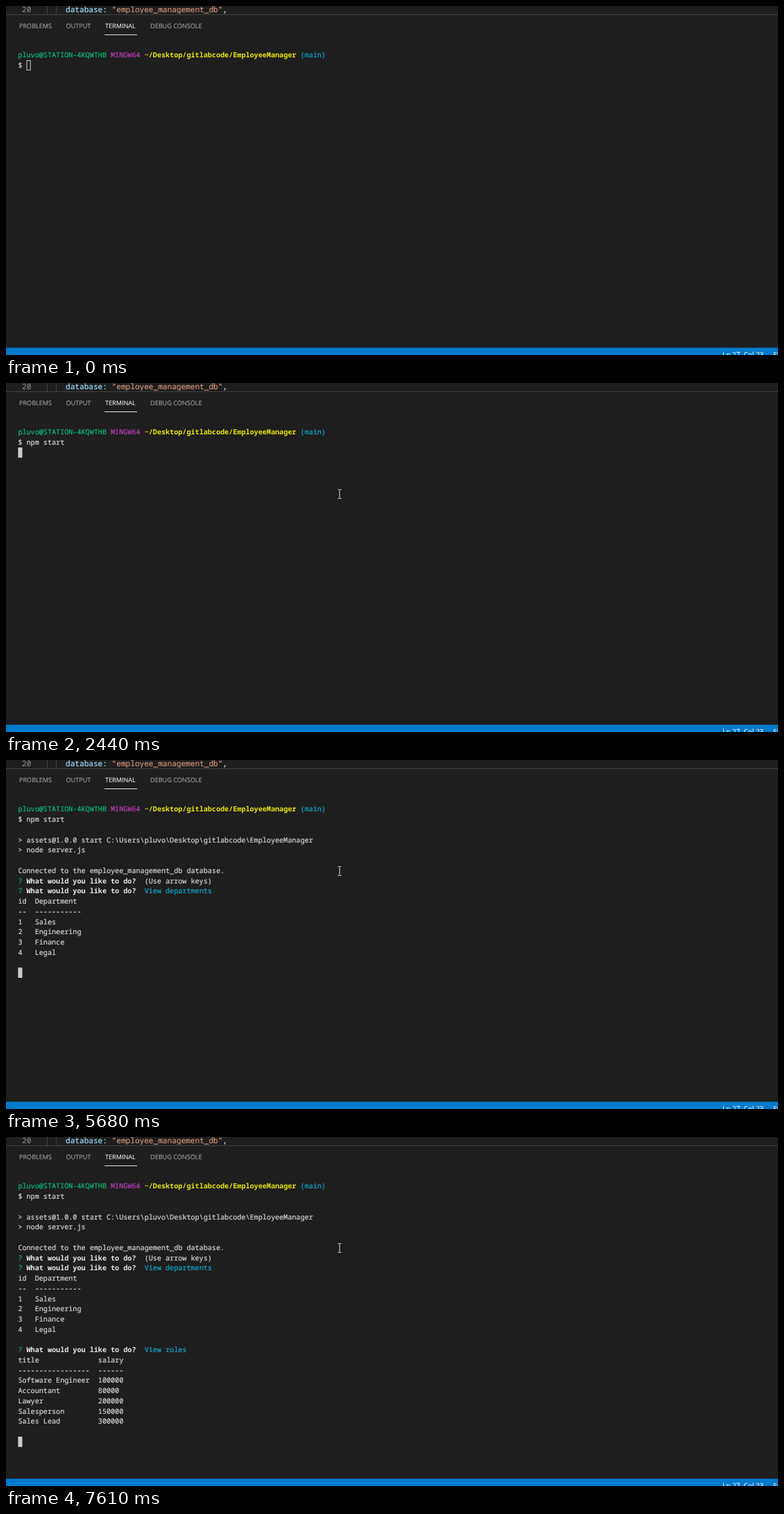
An HTML page for the animation above (8 s loop, 1113x503 px).

```html
<!DOCTYPE html>
<html lang="en">
<head>
<meta charset="utf-8">
<title>Terminal session</title>
<style>
  html, body { margin: 0; width: 100%; height: 100%; overflow: hidden; background: #1e1e1e; }
  #stage { position: relative; width: 1113px; height: 503px; overflow: hidden; background: #1e1e1e; text-rendering: geometricPrecision; }
  #stage div { position: absolute; white-space: pre; }
  .mono { font-family: "Noto Sans Mono", monospace; -webkit-text-stroke: .2px; }
  .ui { font: 9.1px/14px "Open Sans", sans-serif; color: #a8a8a8; -webkit-text-stroke: .1px; }
  #code { left: 0; top: 0; width: 100%; height: 12px; overflow: hidden; font-size: 11.1px; line-height: 14px; border-bottom: 1px solid #414141; }
  #code div { top: -1px; clip-path: inset(0 0 2px); }
  #code .guide { top: 0; width: 1px; height: 14px; background: #404040; }
  #tabs div { top: 21.5px; }
  #tabs .active { color: #efefef; }
  #underline { left: 142px; top: 41px; width: 47px; height: 1px; background: #e7e7e7; }
  #status { left: 0; top: 492px; width: 100%; height: 10px; overflow: hidden; background: #007acc; border-top: 1px solid #0f4c76; }
  #status .ui { top: 2px; font-size: 10px; color: #fff; }
  #screen { left: 17.4px; top: 63.4px; font-size: 10.14px; line-height: 14.74px; color: #d6d6d6; }
  #overlay { position: absolute; left: 0; top: 0; }
  #caret { fill: #ccc; stroke: none; }
  #caret.hollow { fill: none; stroke: #ccc; }
  .user { color: #0dbc79; }
  .host { color: #bc3fbc; }
  .path { color: #e5e510; font-weight: 600; -webkit-text-stroke: 0; }
  .cyan { color: #11a8cd; }
  .mark { color: #10a594; }
  .bold { color: #e8e8e8; font-weight: 700; -webkit-text-stroke: 0; }
</style>
</head>
<body>
<div id="stage">
  <div id="code" class="mono">
    <div style="left:23px;color:#858585">20</div>
    <div class="guide" style="left:59px"></div>
    <div class="guide" style="left:72px"></div>
    <div style="left:86px;color:#d4d4d4"><span style="color:#9cdcfe">database:</span> <span style="color:#ce9178">"employee_management_db"</span>,</div>
  </div>
  <div id="tabs">
    <div class="ui" style="left:19px">PROBLEMS</div>
    <div class="ui" style="left:86.5px">OUTPUT</div>
    <div class="ui active" style="left:143px">TERMINAL</div>
    <div class="ui" style="left:208px">DEBUG CONSOLE</div>
  </div>
  <div id="underline"></div>
  <div id="screen" class="mono"></div>
  <div id="status">
    <div class="ui" style="left:1033px">Ln 27, Col 23</div>
    <div class="ui" style="left:1106px">Spaces: 4</div>
  </div>
  <svg id="overlay" width="1113" height="503">
    <rect id="caret"/>
    <path id="pointer" d="M-2.5-6.5h2M.5-6.5h2M-2.5 6.5h2M.5 6.5h2M0-6V6" fill="none" stroke="#e0e0e0"/>
  </svg>
</div>
<script>
const LOOP = 8000, FOCUS_AT = 530;
const CELL = 6.084, ROW = 14.74, LEFT = 17.4, TOP = 63.4;
const [screenBox, caret, pointer] = ["screen", "caret", "pointer"].map(id => document.getElementById(id));

const paint = (cls, text) => `<span class="${cls}">${text}</span>`;
const ask = rest => `${paint("mark", "?")} ${paint("bold", "What would you like to do?")}  ${rest}`;
const choices = ["View departments", "View roles", "View employees", "Add department",
  "Add role", "Add employee", "Update an employee role"];
const menu = selected => choices.map((text, i) =>
  i === selected ? paint("cyan", "&gt; " + text) : "  " + text);

const prompt = [paint("user", "pluvo@STATION-4KQWTHB"), paint("host", "MINGW64"),
  paint("path", "~/Desktop/gitlabcode/EmployeeManager"), paint("cyan", "(main)")].join(" ");
const hint = "(Use arrow keys)";
const command = "npm start";

const typed = n => [prompt, "$ " + command.slice(0, n)];
const launched = [...typed(9), "",
  String.raw`&gt; assets@1.0.0 start C:\Users\pluvo\Desktop\gitlabcode\EmployeeManager`,
  "&gt; node server.js", ""];
const connected = [...launched, "Connected to the employee_management_db database."];
const firstMenu = [...connected, ask(hint), ...menu(0)];
firstMenu[firstMenu.length - 1] += " Listening";
const departments = [...connected, ask(hint), ask(paint("cyan", choices[0])),
  "id  Department", "--  -----------", "1   Sales", "2   Engineering", "3   Finance", "4   Legal", ""];
const roles = [...departments, ask(paint("cyan", choices[1])),
  ...[["title", "salary"], ["-".repeat(17), "------"], ["Software Engineer", "100000"], ["Accountant", "80000"],
    ["Lawyer", "200000"], ["Salesperson", "150000"], ["Sales Lead", "300000"]]
    .map(([title, salary]) => title.padEnd(19) + salary), ""];

// Each step: start time, lines, caret as [column, row] or null when hidden
const keyTimes = [0, 1450, 1590, 1650, 1720, 1780, 1980, 2050, 2110, 2310];
const steps = [
  ...keyTimes.map((at, n) => [at, typed(n), [n + 2, 1]]),
  [2440, typed(9), [0, 2]],
  [3960, launched, [0, 6]],
  [4760, connected, [0, 7]],
  [4820, firstMenu, null],
  [5680, departments, [0, 16]],
  [6680, [...departments, ask(hint), ...menu(0)], null],
  [7210, [...departments, ask(""), ...menu(1)], null],
  [7610, roles, [0, 25]],
];
const pointerPath = [[190, 997, 457], [260, 740, 310], [330, 560, 206],
  [390, 481, 160], [530, 486, 163], [590, 481, 160]];

const current = (table, t) => table.findLast(([at]) => t >= at);
const show = (node, visible) => node.setAttribute("visibility", visible ? "visible" : "hidden");

function placeCaret([column, row], hollow) {
  const inset = hollow ? 0.5 : 0;
  const box = { x: LEFT + column * CELL + inset, y: TOP + row * ROW + inset,
    width: CELL - 2 * inset, height: ROW - 2 * inset };
  for (const name in box) caret.setAttribute(name, box[name]);
  caret.setAttribute("class", hollow ? "hollow" : "");
}

let shown;
function draw() {
  const t = performance.now() % LOOP;
  const step = current(steps, t);
  const [, lines, cell] = step;
  if (step !== shown) {
    shown = step;
    screenBox.innerHTML = lines
      .map((line, row) => `<div style="top:${row * ROW}px">${line}</div>`).join("");
  }
  show(caret, cell);
  if (cell) placeCaret(cell, t < FOCUS_AT);

  const spot = current(pointerPath, t);
  show(pointer, spot);
  if (spot) pointer.setAttribute("transform", `translate(${spot[1]} ${spot[2]})`);
  requestAnimationFrame(draw);
}
draw();
</script>
</body>
</html>
```
